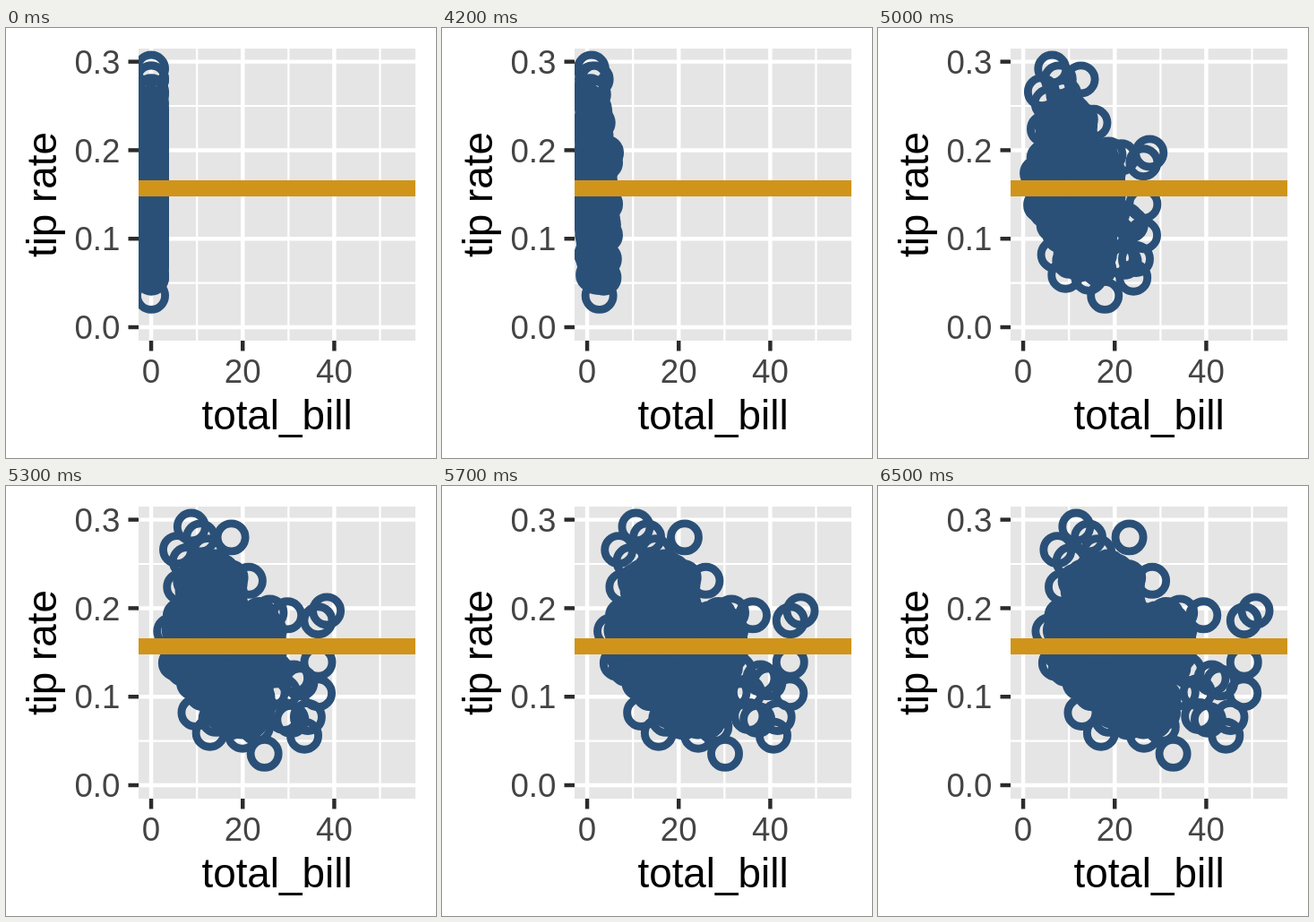
These frames come from a looping animation (480x480 px, 10000 ms). An HTML page:

```html
<!DOCTYPE html>
<html lang="en">
<head>
<meta charset="utf-8">
<title>Tip rate by total bill</title>
<style>
  html, body { margin: 0; width: 100%; height: 100%; overflow: hidden; background: #fff; }
  svg { display: block; width: 100%; height: 100%; }
  text { font-family: "Liberation Sans", Arial, sans-serif; }
  .tick { font-size: 36.67px; fill: #444; }
  .title { font-size: 45.83px; fill: #000; text-anchor: middle; }
</style>
</head>
<body>
<svg viewBox="0 0 480 480">
  <clipPath id="panel"><rect x="148" y="22.9" width="309.1" height="326.1"/></clipPath>
  <g clip-path="url(#panel)">
    <rect x="148" y="22.9" width="309.1" height="326.1" fill="#e5e5e5"/>
    <g id="grid" stroke="#fff"></g>
    <g id="dots" fill="none" stroke="#2a5078" stroke-width="8.86"></g>
    <path d="M148 179H457.1" stroke="#d0941b" stroke-width="17.8"/>
  </g>
  <g id="axes" stroke="#2b2b2b" stroke-width="4.45"></g>
  <g id="labels" class="tick"></g>
  <text class="title" x="302.5" y="448">total_bill</text>
  <text class="title" transform="translate(56 186) rotate(-90)">tip rate</text>
</svg>
<script>
const LOOP = 10000, STEP = 100, FIRST = 33, STEPS = 33;
const px = bill => 162.05 + bill * 5.109;
const py = rate => 334 - rate * 988;

function add(parent, tag, attrs, text) {
  const el = document.createElementNS("http://www.w3.org/2000/svg", tag);
  for (const k in attrs) el.setAttribute(k, attrs[k]);
  if (text) el.textContent = text;
  document.getElementById(parent).appendChild(el);
  return el;
}

// Grid and axes, minor lines first
const vLine = (bill, w) => add("grid", "path", { d: `M${px(bill)} 22V350`, "stroke-width": w });
const hLine = (rate, w) => add("grid", "path", { d: `M148 ${py(rate)}H458`, "stroke-width": w });
for (let i = 0; i < 3; i++) {
  hLine(0.05 + i / 10, 2.22);
  vLine(10 + i * 20, 2.22);
}
for (let i = 0; i <= 3; i++) {
  const rate = i / 10, y = py(rate);
  hLine(rate, 4.45);
  add("axes", "path", { d: `M136.5 ${y}H148` });
  add("labels", "text", { x: 127.4, y: y + 13.2, "text-anchor": "end" }, rate.toFixed(1));
}
for (let bill = 0; bill <= 40; bill += 20) {
  const x = px(bill);
  vLine(bill, 4.45);
  add("axes", "path", { d: `M${x} 349V360.5` });
  add("labels", "text", { x, y: 396, "text-anchor": "middle" }, String(bill));
}

// Evenly spread points in an ellipse (golden-angle spiral)
function blob(bill, rate, rx, ry) {
  const n = Math.round(rx * ry * 230);
  return Array.from({ length: n }, (_, i) => {
    const r = Math.sqrt((i + 0.5) / n), a = i * 2.39996;
    return [bill + rx * r * Math.cos(a), rate + ry * r * Math.sin(a)];
  });
}

// Dense cloud, then the stray points around it: bill, tip rate
const points = [
  ...blob(18.3, 0.156, 9.3, 0.057),
  ...blob(25, 0.09, 6.7, 0.021),
  ...blob(30.5, 0.16, 4.3, 0.033),
  ...blob(17.5, 0.225, 6.5, 0.022),
  ...blob(9.6, 0.165, 2, 0.034),
  [11.6, 0.292], [14.3, 0.28], [23.2, 0.28], [7.5, 0.266], [16.3, 0.263], [10.3, 0.253],
  [28.2, 0.231], [8.6, 0.224], [34.3, 0.195], [39.4, 0.192], [50.8, 0.197], [48.3, 0.186],
  [48.3, 0.139], [48.2, 0.104], [45.3, 0.077], [44.3, 0.056], [43.1, 0.116], [41.2, 0.121],
  [40.5, 0.074], [38.4, 0.078], [38.1, 0.105], [35.8, 0.13], [34.6, 0.105], [32.8, 0.0356],
  [30.3, 0.066], [26.4, 0.057], [18.8, 0.075], [17, 0.059], [12.8, 0.082], [7.2, 0.138],
  [5.75, 0.174]
];

const dots = points.map(([bill, rate]) => ({
  bill,
  el: add("dots", "circle", { cy: py(rate), r: 15.53 })
}));

const cubicInOut = t => t < 0.5 ? 4 * t ** 3 : 1 - 4 * (1 - t) ** 3;

function draw(ms) {
  const step = Math.min(STEPS, Math.max(0, Math.floor(ms / STEP) - FIRST));
  const k = cubicInOut(step / STEPS);
  for (const d of dots) d.el.setAttribute("cx", px(d.bill * k));
}

function tick() {
  draw(performance.now() % LOOP);
  requestAnimationFrame(tick);
}
tick();
</script>
</body>
</html>
```
